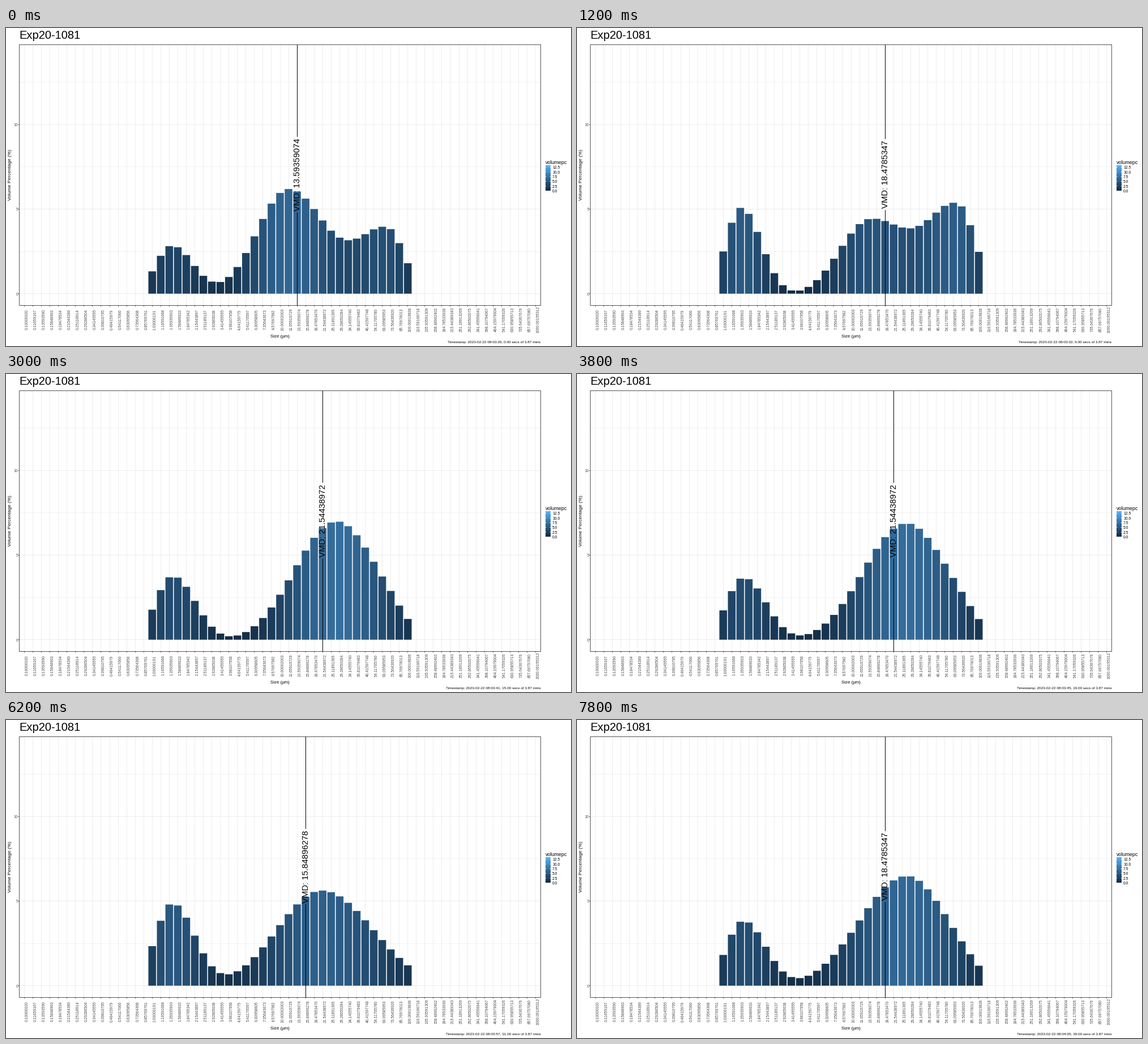
Recreate the animation shown at these times as a matplotlib script. Size 998x561 px, loop 8000 ms.

```python
import numpy as np
import matplotlib.pyplot as plt
from matplotlib.animation import FuncAnimation
from matplotlib.colors import LinearSegmentedColormap
from matplotlib.patches import Rectangle

W, H, DPI = 998, 561, 100
FRAMES, STEP = 40, 200
LEFT, RIGHT, TOP, BOTTOM = 23.5, 944.5, 29.5, 489.5
PITCH = (RIGHT - LEFT) / 61.2
Y0, UNIT = 468.7, 29.86
FIRST, BARS = 15, 31
LIMIT = 13.3

plt.rcParams["font.family"] = "Liberation Sans"
blues = LinearSegmentedColormap.from_list(
    "blues", ["#132B43", "#22496C", "#336A98", "#448DC6", "#56B1F7"])
sizes = np.float32(10 ** (np.arange(61) / 15 - 1) * 1.00000196)

# Three droplet modes, each parameter eased between a few moments
SECONDS = [0, 6, 9, 15, 24, 31, 39]
FINE_PEAK = [3.1, 5.35, 3.9, 4.0, 3.83, 5.0, 4.05]
FINE_WIDTH = [2.6, 2.4, 2.6, 2.7, 2.65, 2.65, 2.65]
MAIN_PEAK = [6.45, 4.65, 5.35, 7.05, 6.9, 5.75, 6.6]
MAIN_BIN = [16, 17.3, 17.1, 21.4, 21.1, 19.9, 21.4]
MAIN_LEFT = [3.75, 3.65, 4.1, 4.8, 5.1, 5.3, 5.5]
MAIN_RIGHT = [4.4, 4.65, 4.5, 4.4, 4.6, 6.05, 4.65]
COARSE_PEAK = [4.0, 5.2, 4.4, 0.85, 0.8, 0, 0.45]
FLOOR = 0.25


def bump(x, peak, center, left, right):
    """Bell curve with its own width on each side."""
    return peak * np.exp(-0.5 * ((x - center) / np.where(x < center, left, right)) ** 2)


def volumes(sec):
    fine, width, main, center, left, right, coarse = (
        np.interp(sec, SECONDS, p) for p in
        (FINE_PEAK, FINE_WIDTH, MAIN_PEAK, MAIN_BIN, MAIN_LEFT, MAIN_RIGHT, COARSE_PEAK))
    x = np.arange(BARS)
    vol = (bump(x, fine, width - 0.3, 0.76 * width, width)
           + bump(x, main, center, left, right)
           + bump(x, coarse, 27.6, 3.4, 2.05) - FLOOR)
    vol = np.maximum(vol, 0)
    return 100 * vol / vol.sum()


def bin_x(i):
    return LEFT + (i + 0.6) * PITCH


def vol_y(v):
    return Y0 - v * UNIT


def mid_pixel(v):
    return np.floor(v) + 0.5


fig = plt.figure(figsize=(W / DPI, H / DPI), dpi=DPI, facecolor="white")
ax = fig.add_axes([0, 0, 1, 1])


def line(x, y, color, px, z):
    return ax.plot(x, y, color=color, lw=px * 72 / DPI, zorder=z, snap=False,
                   solid_capstyle="butt")[0]


def vline(x, y0, y1, color, px, z):
    return line([mid_pixel(x)] * 2, [y0, y1], color, px, z)


def hline(y, x0, x1, color, px, z):
    return line([x0, x1], [mid_pixel(y)] * 2, color, px, z)


def text(x, y, s, px, color="black", ha="left", rot=0, va="center_baseline"):
    return ax.text(x, y, s, fontsize=px * 72 / DPI, color=color, ha=ha, va=va,
                   rotation=rot, rotation_mode="anchor", zorder=6)


# Grid, ticks and axis labels
for i, size in enumerate(sizes):
    x = bin_x(i)
    vline(x, TOP, BOTTOM, "#EBEBEB", 0.9, 1)
    vline(x, BOTTOM, BOTTOM + 2, "#333333", 0.8, 4)
    text(x + 3.6, 514.5, f"{size:.8f}", 6.75, "#4D4D4D", "center", 90)
for v in (2.5, 7.5, 12.5):
    hline(vol_y(v), LEFT, RIGHT, "#EBEBEB", 0.6, 1)
for v in (0, 5, 10):
    hline(vol_y(v), LEFT, RIGHT, "#EBEBEB", 0.9, 1)
    hline(vol_y(v), LEFT - 2, LEFT, "#333333", 0.8, 4)
    text(LEFT - 2.3, vol_y(v) + 0.5, str(v), 6.75, "#4D4D4D", "right")
ax.add_patch(Rectangle((LEFT, TOP), RIGHT - LEFT, BOTTOM - TOP, fill=False,
                       ec="#333333", lw=0.6, snap=False, zorder=5))

text(LEFT, 19, "Exp20-1081", 20.1, va="baseline")
text((LEFT + RIGHT) / 2, 543, "Size (µm)", 7.9, ha="center")
text(6.7, 258.5, "Volume Percentage (%)", 8.5, ha="center", rot=90)

# Colour legend
text(953, 236.8, "volumepc", 8.9)
LX, LW, LY, LU = 953, 9, 287.3, 3.33
ax.imshow(np.linspace(1, 0, 64)[:, None], cmap=blues, aspect="auto", zorder=3,
          extent=(LX, LX + LW, LY, LY - LU * LIMIT), interpolation="bilinear")
for v in np.arange(0, 13, 2.5):
    y = LY - LU * v
    for x in (LX, LX + LW * 0.8):
        line([x, x + LW * 0.2], [y, y], "white", 0.6, 4)
    text(965, y + 0.3, f"{v:.1f}", 6.75)

# Moving parts
MID = 258.6
bars = [ax.add_patch(Rectangle((bin_x(FIRST + i) - 0.45 * PITCH, Y0), 0.9 * PITCH, 0,
                               lw=0, snap=False, zorder=2))
        for i in range(BARS)]
upper = vline(0, TOP, MID, "black", 1, 4)
lower = vline(0, MID, BOTTOM, "black", 1, 4)
vmd = text(0, MID, "", 14.9, ha="center", rot=90)
caption = text(RIGHT, 554, "", 6.5, ha="right")

ax.set(xlim=(0, W), ylim=(H, 0))
ax.axis("off")


def update(sec):
    vol = volumes(sec)
    for bar, v in zip(bars, vol):
        bar.set_height(-v * UNIT)
        bar.set_facecolor(blues(v / LIMIT))

    # The marker sits on the bin where half of the volume is reached
    total = np.cumsum(vol)
    median = FIRST + int(np.searchsorted(total, total[-1] / 2))
    x = mid_pixel(bin_x(median))
    label = "VMD: " + f"{sizes[median]:.8f}".rstrip("0")
    gap = len(label) * 4.17
    vmd.set_text(label)
    vmd.set_x(x - 0.5)
    upper.set_data([x, x], [TOP, MID - gap])
    lower.set_data([x, x], [MID + gap, BOTTOM])

    minute, second = divmod(3 * 60 + 26 + sec, 60)
    caption.set_text(f"Timestamp: 2023-02-22 08:{minute:02d}:{second:02d}, "
                     f"{sec:.2f} secs of 3.87 mins")
    return [*bars, upper, lower, vmd, caption]


anim = FuncAnimation(fig, update, frames=FRAMES, interval=STEP,
                     repeat=True, repeat_delay=0, blit=False)
plt.show()
```
